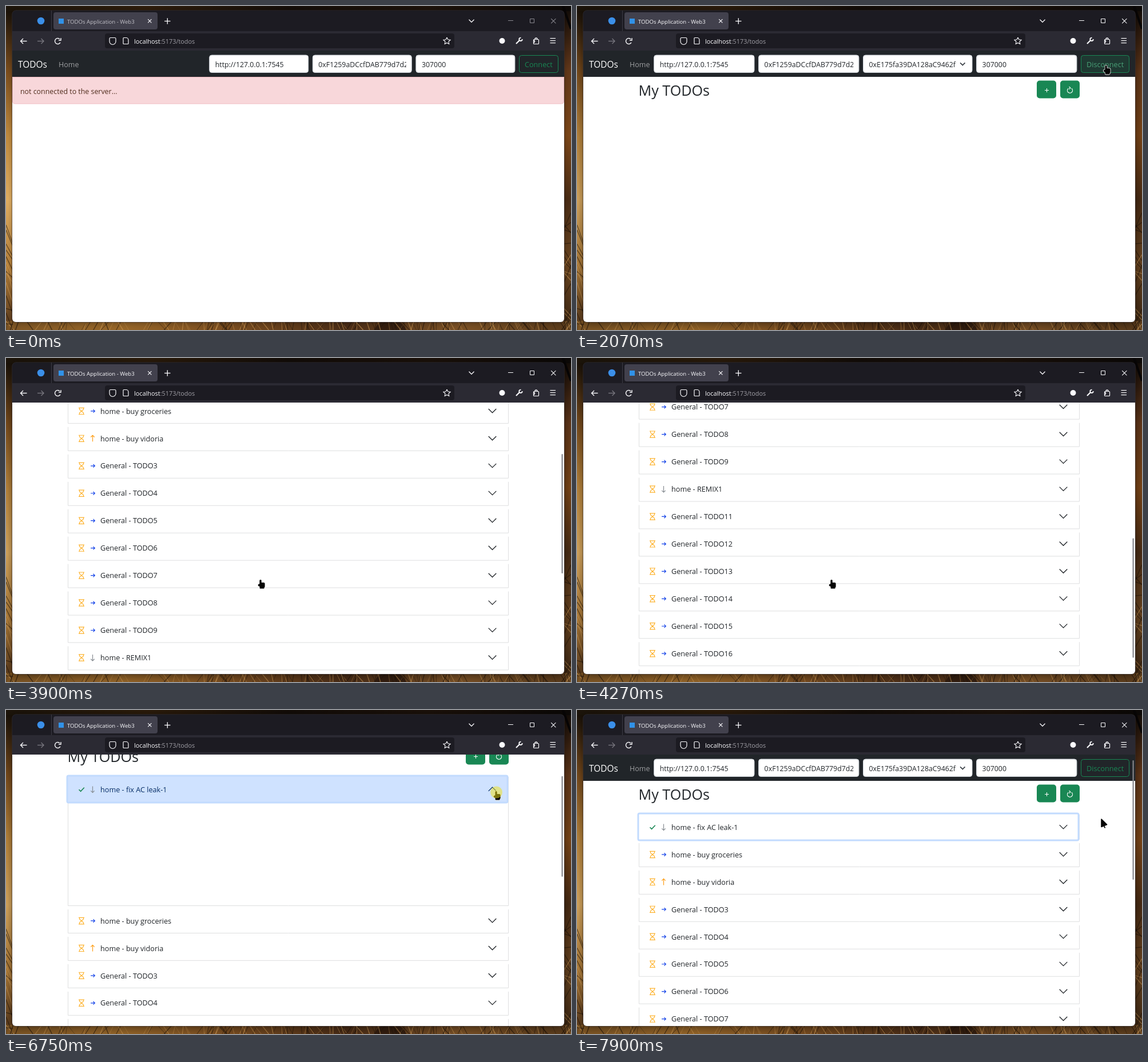
These frames come from a looping animation (988 px wide and 567 px high, 8 s). An HTML page with a canvas:

```html
<!DOCTYPE html>
<html lang="en">
<head>
<meta charset="utf-8">
<title>TODOs Application</title>
<style>
html, body { margin: 0; width: 100%; height: 100%; overflow: hidden; background: #1a1008; }
canvas { display: block; }
</style>
</head>
<body>
<canvas id="stage" width="988" height="567"></canvas>
<script>
const W = 988, H = 567, LOOP = 8000;
const ctx = document.getElementById('stage').getContext('2d');
const FONT = '"Open Sans", "Noto Sans", sans-serif';
const GREEN = '#198754', INK = '#212529', LIGHT = '#fbfbfe', BORDER = '#dedfe0';
const PITCH = 47.95, PAGE_H = 969, MAX_SCROLL = 494, BODY = 182;

// timing in ms
const FOCUS = 1930, CONNECT = 2010, LIST = 2280, PRESS = 5550, OPEN = 5870, SHUT = 6885;

const MOVES = [
  { from: 610, to: 1730, x: 925, y: 104 },
  { from: 2250, to: 3560, x: 445, y: 388 },
  { from: 4590, to: 5280, x: 857, y: 142 },
  { from: 7220, to: 7490, x: 917, y: 191 }
];

const rows = ['home - fix AC leak-1', 'home - buy groceries', 'home - buy vidoria'];
for (let i = 3; i < 18; i++) rows.push(i === 10 ? 'home - REMIX1' : 'General - TODO' + i);

const ramp = (t, a, b) => Math.max(0, Math.min(1, (t - a) / (b - a)));
const mix = (a, b, k) => a + (b - a) * k;
const rgb = (a, b, k) => `rgb(${a.map((v, i) => Math.round(mix(v, b[i], k))).join()})`;
const inOut = (u, p) => u < .5 ? (2 * u) ** p / 2 : 1 - (2 - 2 * u) ** p / 2;

// CSS "ease", solved by bisection
function ease(x) {
  let s = .5;
  for (let step = .25; step > 1e-6; step /= 2)
    s += step * Math.sign(x - (.75 * s * (1 - s) + s ** 3));
  return .3 * s * (1 - s) ** 2 + 3 * s * s * (1 - s) + s ** 3;
}

function cursorAt(t) {
  let x = 943, y = 556;
  for (const m of MOVES) {
    const k = inOut(ramp(t, m.from, m.to), 3);
    x = mix(x, m.x, k);
    y = mix(y, m.y, k);
  }
  return [x, y];
}

const scrollAt = t => MAX_SCROLL * inOut(ramp(t, 3740, 4140), 2)
  - (MAX_SCROLL - 66) * inOut(ramp(t, 4198, 4540), 2)
  - 66 * inOut(ramp(t, 7530, 7900), 2);

const bodyAt = t => BODY * (ease(ramp(t, OPEN, OPEN + 350)) - ease(ramp(t, SHUT, SHUT + 350)));

function text(str, x, y, size, color) {
  ctx.font = `${size}px ${FONT}`;
  ctx.fillStyle = color;
  ctx.fillText(str, x, y);
}

function box(x, y, w, h, r, fill, stroke, lw = 1) {
  ctx.beginPath();
  ctx.roundRect(x, y, w, h, r);
  if (fill) { ctx.fillStyle = fill; ctx.fill(); }
  if (stroke) { ctx.strokeStyle = stroke; ctx.lineWidth = lw; ctx.stroke(); }
}

function line(color, lw, ...pts) {
  ctx.strokeStyle = color;
  ctx.lineWidth = lw;
  ctx.beginPath();
  for (let i = 0; i < pts.length; i += 2) ctx.lineTo(pts[i], pts[i + 1]);
  ctx.stroke();
}

function arc(x, y, r, a, b, color, lw) {
  ctx.beginPath();
  ctx.arc(x, y, r, a, b);
  ctx.strokeStyle = color;
  ctx.lineWidth = lw;
  ctx.stroke();
}

function disc(x, y, r, fill) {
  ctx.beginPath();
  ctx.arc(x, y, r, 0, 7);
  ctx.fillStyle = fill;
  ctx.fill();
}

function turned(x, y, angle, paint) {
  ctx.save();
  ctx.translate(x, y);
  ctx.rotate(angle);
  paint();
  ctx.restore();
}

const chevron = (x, y, r, lw, color, angle = 0) =>
  turned(x, y, angle, () => line(color, lw, -r, -r / 2, 0, r / 2, r, -r / 2));

const arrow = (x, y, r, head, angle, color, lw = 1.2) => turned(x, y, angle, () => {
  line(color, lw, -r, 0, r, 0);
  line(color, lw, r - head, -head, r, 0, r - head, head);
});

const plus = (x, y, r, lw, color, angle = 0) => turned(x, y, angle, () => {
  line(color, lw, -r, 0, r, 0);
  line(color, lw, 0, -r, 0, r);
});

function strip(x, y, w, h, ...colors) {
  const g = ctx.createLinearGradient(x, y, h > w ? x : x + w, h > w ? y + h : y);
  colors.forEach((c, i) => g.addColorStop(i / (colors.length - 1), c));
  ctx.fillStyle = g;
  ctx.fillRect(x, y, w, h);
}

function wallpaper() {
  strip(0, 0, 14, H, '#120d07', '#7a4c1c', '#c08a3e', '#e0ae62', '#b5803a', '#54351a');
  strip(974, 0, 14, H, '#0d0906', '#63381a', '#7d4718', '#4a2c14', '#6a4520', '#3a2512');
  strip(0, 0, W, 9, '#1c140a', '#2e1d0b', '#140d08', '#1d120a', '#0b0806');
  strip(0, 551, W, 16, '#7d5524', '#986729', '#7a4d20', '#4a2c16', '#7c5226', '#5a3b1b');
  ctx.globalAlpha = .7;
  disc(672, 578, 30, '#24130b');
  ctx.globalAlpha = 1;
  let seed = 11;
  const rnd = () => (seed = seed * 16807 % 2147483647) / 2147483647;
  const blade = () => rnd() < .55 ? 'rgba(30,18,8,.6)' : 'rgba(226,172,98,.5)';
  for (let i = 0; i < 170; i++) {
    const x = rnd() * W;
    line(blade(), .5 + rnd(), x, H, x + (rnd() - .5) * 30, 551);
  }
  for (let i = 0; i < 16; i++) {
    const y = H - 210 * rnd();
    line(blade(), 1.2, 0, y, 12, y + 50 * rnd());
    line(blade(), 1.2, 976, y, W, y + 60 * (rnd() - .5));
  }
  line('#070505', 4, 974, 0, W, 40);
}

function tabBar(focused) {
  const dim = focused ? LIGHT : '#8a8990';
  box(11, 8, 965, 60, 6, '#1c1b22');
  line('#3b3a44', 1, 79.5, 8, 79.5, 44);
  box(83, 11, 182, 30, 4, '#42414d');
  disc(61, 26, 6.3, '#3b8fe8');
  box(92, 22, 9, 9, 0, '#3192e8');
  text('TODOs Application - Web3', 107, 30.5, 9.6, focused ? LIGHT : '#c3c2c9');
  plus(251.3, 26.3, 4.4, 1.1, LIGHT, Math.PI / 4);
  plus(282.3, 26.5, 5.2, 1.3, LIGHT);
  chevron(814, 26, 4.5, 1.3, LIGHT);
  line(dim, 1, 878, 25.5, 887, 25.5);
  box(916.5, 22.5, 7, 7, 0, null, dim);
  plus(957.3, 26.2, 5.8, 1, dim, Math.PI / 4);
}

function toolbar() {
  ctx.fillStyle = '#2b2a33';
  ctx.fillRect(11, 44, 965, 34);
  arrow(31, 61.5, 5.5, 4.5, Math.PI, LIGHT, 1.4);
  arrow(60.5, 61.5, 5.5, 4.5, 0, '#77767e', 1.4);
  arc(90.5, 61.5, 5, .5, 5.5, LIGHT, 1.4);
  line(LIGHT, 1.4, 96, 56, 96, 60, 92, 60);

  box(173, 48, 611, 26, 4, '#1c1b22');
  box(181, 55.5, 11, 12, [2, 2, 6, 6], null, LIGHT, 1.2);
  box(205, 55.5, 9, 11, [1, 4, 1, 1], null, LIGHT, 1.2);
  text('localhost', 224, 65.8, 10.9, LIGHT);
  text(':5173/todos', 224 + ctx.measureText('localhost').width, 65.8, 10.9, '#a09fa6');
  const star = [];
  for (let i = 0; i < 11; i++) {
    const a = (i / 5 - .5) * Math.PI, r = i % 2 ? 3.1 : 6.4;
    star.push(771 + r * Math.cos(a), 61.3 + r * Math.sin(a));
  }
  line(LIGHT, 1.1, ...star);

  disc(867.5, 61, 5, LIGHT);
  line(LIGHT, 2.2, 892, 66, 898.5, 59.5);
  arc(900, 58.3, 2.7, -.1, 4.9, LIGHT, 1.9);
  box(922.5, 58.5, 9, 8, 1, null, LIGHT, 1.2);
  arc(927, 58, 2, Math.PI, 0, LIGHT, 1.4);
  arc(922.5, 62, 2, -1.5, 1.5, LIGHT, 1.4);
  for (let i = -1; i < 2; i++) line(LIGHT, 1.2, 951.5, 60.6 + 4 * i, 961, 60.6 + 4 * i);
}

function input(x, w, value, pad) {
  box(x + .5, 86, w - 1, 30.5, 4, '#fff', '#ced4da');
  ctx.save();
  ctx.beginPath();
  ctx.rect(x, 86, w - pad, 31);
  ctx.clip();
  text(value, x + 10.5, 106.7, 12.35, INK);
  ctx.restore();
}

function navButton(x, w, label, hover) {
  ctx.globalAlpha = hover;
  box(x, 86, w, 31, 4, GREEN);
  ctx.globalAlpha = 1;
  box(x + .5, 86.5, w - 1, 30, 4, null, GREEN);
  text(label, x + 10, 106.7, 12.65, rgb([25, 135, 84], [255, 255, 255], hover));
}

// fields are laid out leftwards from the button
function navbar(t) {
  const on = t >= CONNECT, gap = 6.6;
  ctx.fillStyle = INK;
  ctx.fillRect(11, 78, 965, 46);
  text('TODOs', 21, 107.6, 15.4, '#fff');
  text('Home', 92, 106.7, 12.5, '#9b9d9f');
  let x = on ? 881 : 897;
  const hover = on ? ramp(t, 2040, 2190) - ramp(t, 2500, 2650) : ramp(t, 1560, 1710);
  navButton(x, 966 - x, on ? 'Disconnect' : 'Connect', hover);
  const fields = ['307000', '0xF1259aDCcfDAB779d7d2B8', 'http://127.0.0.1:7545'];
  if (on) fields.splice(1, 0, '0xE175fa39DA128aC9462f7c');
  fields.forEach((value, i) => {
    const select = on && i === 1, w = select ? 191.5 : on ? 176.3 : 174;
    x -= w + gap;
    input(x, w, value, select ? 29 : 10);
    if (select) chevron(x + w - 17.2, 101.5, 4.2, 1.6, '#343a40');
  });
}

function heading() {
  text('My TODOs', 107.5, 156.7, 25.1, INK);
  for (const x of [804, 845]) box(x, 130.5, 34, 31, 5, GREEN);
  plus(821.5, 147.5, 3.5, 1, '#fff');
  arc(862, 147.8, 4.5, -.9, 4.1, '#fff', 1.2);
  chevron(861.7, 143.4, 2.2, 1.3, '#fff', -Math.PI / 2);
}

function rowIcons(i, y) {
  if (i === 0) line(GREEN, 1.6, 127.5, y + .3, 130.6, y + 3.4, 136.8, y - 3.2);
  else for (const s of [-5.6, 5.6]) {
    line('#fdb32f', 1.2, 127, y + s, 137, y + s);
    line('#fdb32f', 1.2, 128.3, y + s, 128.7, y + s / 2, 132, y, 135.3, y + s / 2, 135.7, y + s);
  }
  if (i === 0 || i === 10) arrow(151.5, y, 5.5, 3.2, Math.PI / 2, '#868c92');
  else if (i === 2) arrow(151.5, y, 5.5, 3.2, -Math.PI / 2, '#fd9d14');
  else arrow(151.7, y, 3.6, 2.8, 0, '#1443e8');
}

function list(t, open) {
  const shut = ramp(t, SHUT, SHUT + 150), ring = ramp(t, PRESS, PRESS + 110);
  const flip = Math.PI * (1 - ease(ramp(t, SHUT, SHUT + 200)));
  rows.forEach((label, i) => {
    const first = i === 0;
    const y = 205 + PITCH * i + (first ? 0 : open);
    const top = y - (first ? 22 : 20), bottom = y + 21.5 + (first ? open : 0);
    line(BORDER, 1, 108.5, top, 108.5, bottom, 878.5, bottom, 878.5, top);
    if (first) {
      line(BORDER, 1, 108.5, top - .5, 876, top - .5);
      ctx.globalAlpha = ring;
      box(105.5, y - 25.5, 773, 50, 4, '#c2dbfe');
      ctx.globalAlpha = 1;
      box(108.5, y - 22.5, 767, 44, 1, rgb([207, 226, 255], [255, 255, 255], shut));
    }
    const color = first ? rgb([5, 44, 101], [33, 37, 41], shut) : INK;
    rowIcons(i, y);
    text(label, 165, y + 4.7, 12.65, color);
    chevron(850.5, y - .5, 6.8, 1.3, color, first ? flip : 0);
  });
}

function page(t, scroll, open) {
  ctx.save();
  ctx.beginPath();
  ctx.roundRect(11, 78, 965, 475, [0, 0, 6, 6]);
  ctx.clip();
  ctx.fillStyle = '#fff';
  ctx.fillRect(11, 78, 965, 475);
  ctx.translate(0, -scroll);
  navbar(t);
  if (t < CONNECT) {
    box(11.5, 124.5, 964, 46.5, [0, 0, 4, 4], '#f8d7da', '#efbcc2');
    text('not connected to the server...', 25, 153.6, 12.4, '#4f2c1c');
  } else heading();
  if (t >= LIST) list(t, open);
  ctx.restore();
  if (t >= LIST) {
    const k = PAGE_H / (PAGE_H + open);
    box(971.5, 88 + scroll * k / 2, 2.2, 209 * k, 1, '#85868c');
  }
}

function pointer(x, y, hand) {
  const shape = new Path2D();
  if (hand) {
    shape.roundRect(-1.6, 0, 3.3, 10, 1.6);
    shape.roundRect(-1.6, 5, 9.2, 9, 2);
    shape.roundRect(-4.3, 7.5, 6, 4, 2);
    shape.roundRect(-1.4, 9, 8, 6.6, 1);
  } else {
    shape.lineTo(0, 0);
    shape.lineTo(0, 13.5);
    shape.lineTo(9.6, 9.6);
    shape.closePath();
    shape.moveTo(3, 9);
    shape.lineTo(6.5, 15.5);
  }
  turned(x, y, 0, () => {
    ctx.lineJoin = 'round';
    for (const [color, lw] of [['#fff', hand ? 1.6 : 3.4], ['#050505', hand ? 0 : 1.6]]) {
      ctx.strokeStyle = ctx.fillStyle = color;
      ctx.lineWidth = lw || .1;
      ctx.stroke(shape);
      ctx.fill(shape);
    }
  });
}

function draw(t) {
  const focused = t >= FOCUS, scroll = scrollAt(t);
  wallpaper();
  ctx.save();
  ctx.shadowColor = `rgba(0,0,0,${focused ? .55 : .3})`;
  ctx.shadowBlur = focused ? 18 : 10;
  ctx.shadowOffsetY = 2;
  box(10.5, 7.5, 966, 546, 7, '#35323a');
  ctx.restore();
  tabBar(focused);
  toolbar();
  page(t, scroll, bodyAt(t));

  if (t < MOVES[0].from) return;
  const [x, y] = cursorAt(t);
  const onButton = x > 881 && y > 86 && y < 117;
  const onRow = t >= LIST && x > 108 && x < 876 && y + scroll > 182;
  pointer(x, y, onButton || onRow);
  const clicking = [[1870, CONNECT], [PRESS, OPEN], [6750, SHUT]].some(([a, b]) => t >= a && t < b);
  if (clicking) disc(x + .5, y + 2, 10.5, 'rgba(240,225,20,.5)');
}

const start = performance.now();
function tick() {
  draw((performance.now() - start) % LOOP);
  requestAnimationFrame(tick);
}
tick();
</script>
</body>
</html>
```
